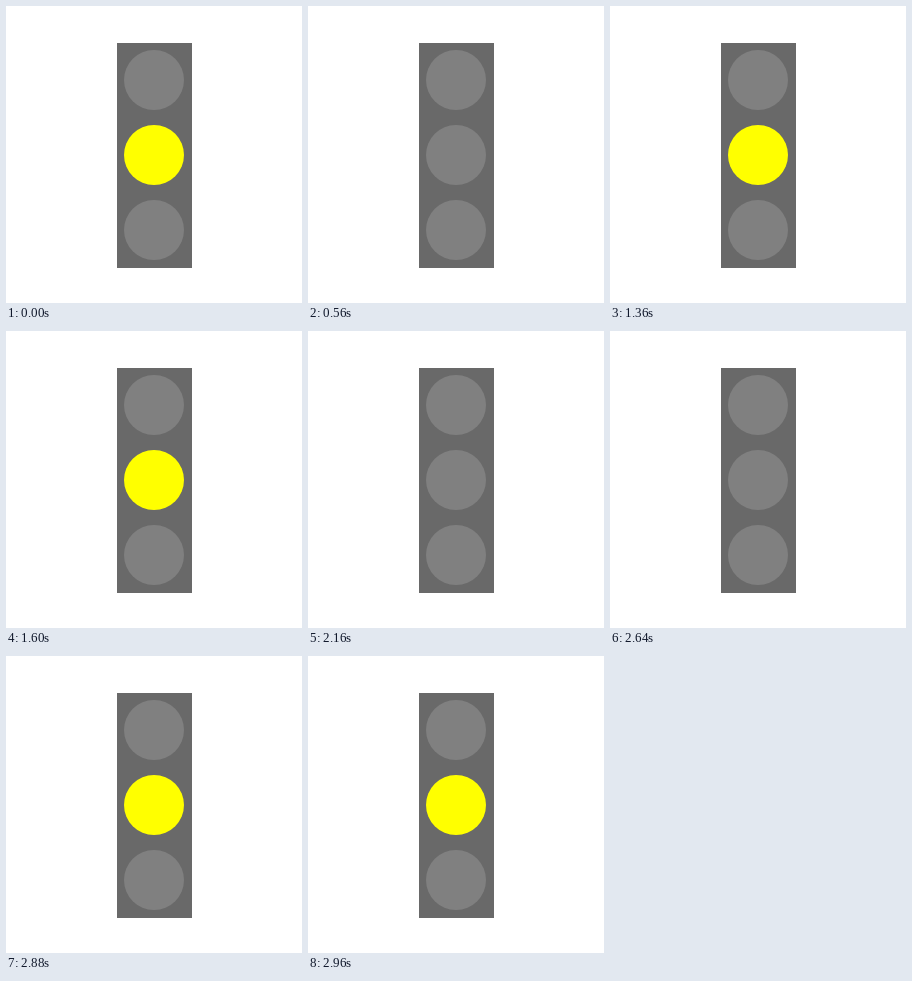
An HTML page without scripts that plays this animation: 296x297 px, repeating every 3.2 s.

```html
<!DOCTYPE html>
<html lang="en">
<head>
<meta charset="utf-8">
<title>Blinking traffic light</title>
<style>
  html, body {
    margin: 0;
    width: 100%;
    height: 100%;
    overflow: hidden;
    background: #fff;
  }
  svg { display: block; width: 100%; height: 100%; }
  .housing { fill: #696969; }
  .lamp { fill: #808080; }
  .amber { animation: blink 3.2s step-end infinite; }

  /* on at 0, 1360 and 2880 ms; off at 560 and 2160 ms */
  @keyframes blink {
    0%, 42.5%, 90%, 100% { fill: #ff0; }
    17.5%, 67.5% { fill: #808080; }
  }
</style>
</head>
<body>
<svg viewBox="0 0 296 297">
  <rect class="housing" x="111" y="37" width="75" height="225"/>
  <circle class="lamp" cx="148" cy="74" r="30"/>
  <circle class="lamp amber" cx="148" cy="149" r="30"/>
  <circle class="lamp" cx="148" cy="224" r="30"/>
</svg>
</body>
</html>
```
